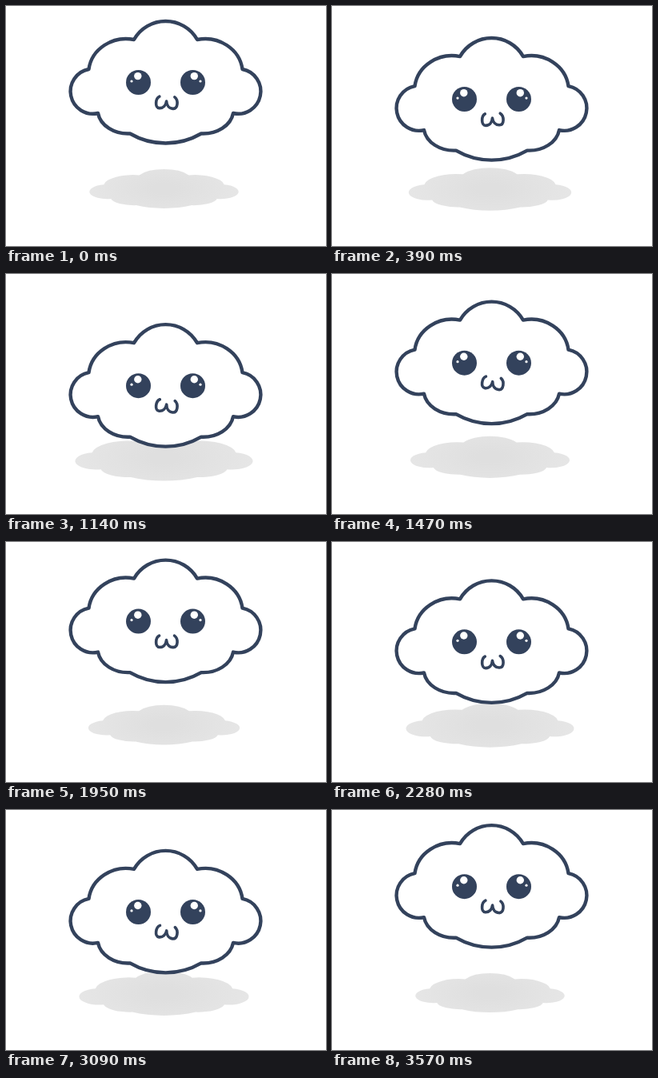
An HTML page with a canvas that plays this animation: 400 by 300 pixels, repeating every 3.6 s.

```html
<!DOCTYPE html>
<html lang="en">
<head>
<meta charset="utf-8">
<title>Floating cloud</title>
<style>
  html, body { margin: 0; width: 100%; height: 100%; overflow: hidden; background: #fff; }
  canvas { display: block; width: 400px; height: 300px; }
</style>
</head>
<body>
<canvas id="stage" width="400" height="300"></canvas>
<script>
const ctx = document.getElementById('stage').getContext('2d');
const INK = '#33425c';
const PERIOD = 1800;
const DROP = 53;

const cloud = new Path2D(
  'M160 42 A45.4 45.4 0 0 1 239 42 A47 43.6 0 0 1 295.5 79 ' +
  'A28.1 28.1 0 1 1 284 134 A38 30 0 0 1 244 159.5 ' +
  'A88.5 88.5 0 0 1 155 159.5 A38 30 0 0 1 115 134 ' +
  'A28.1 28.1 0 1 1 103.5 79 A47 43.6 0 0 1 160 42 Z');

const mouth = new Path2D(
  'M191.5 113.5 C186.5 116 186 128 192 128 C197 128 200 124 200.5 119 ' +
  'C201 124 204 128 209 128 C215.5 128 215.5 117 210.5 113.5');

function dot(x, y, r, color) {
  ctx.fillStyle = color;
  ctx.beginPath();
  ctx.arc(x, y, r, 0, Math.PI * 2);
  ctx.fill();
}

function eye(x, bigX, smallX) {
  dot(x, 95.5, 15.5, INK);
  dot(bigX, 87.6, 4.7, '#fff');
  dot(smallX, 94, 1.6, '#fff');
}

function drawShadow(fall) {
  const grow = 1 + 0.23 * fall;
  ctx.save();
  ctx.translate(197.5, 224);
  ctx.scale(grow, grow);
  ctx.translate(0, 4.5);
  ctx.scale(0.784, 0.321);
  ctx.translate(-199.5, -95.25);
  const shade = ctx.createRadialGradient(199.5, 95, 20, 199.5, 95, 120);
  shade.addColorStop(0, '#dfdfdf');
  shade.addColorStop(1, '#e6e6e6');
  ctx.fillStyle = shade;
  ctx.fill(cloud);
  ctx.restore();
}

function drawMouth(angle) {
  const tilt = (2.5 - 4.5 * Math.sin(angle)) * Math.PI / 180;
  ctx.save();
  ctx.translate(200.5, 121);
  ctx.rotate(tilt);
  ctx.translate(-200.5, -121);
  ctx.lineWidth = 3.6;
  ctx.stroke(mouth);
  ctx.restore();
}

function drawCloud(fall, angle) {
  ctx.save();
  ctx.translate(0, DROP * fall);
  ctx.lineJoin = ctx.lineCap = 'round';
  ctx.strokeStyle = INK;
  ctx.fillStyle = '#fff';
  ctx.lineWidth = 4.4;
  ctx.fill(cloud);
  ctx.stroke(cloud);
  eye(165.5, 164.8, 157);
  eye(233.5, 235.3, 243);
  drawMouth(angle);
  ctx.restore();
}

function draw(now) {
  const angle = (now % PERIOD) / PERIOD * Math.PI * 2;
  const fall = (1 - Math.cos(angle)) / 2;
  ctx.fillStyle = '#fff';
  ctx.fillRect(0, 0, 400, 300);
  drawShadow(fall);
  drawCloud(fall, angle);
}

const start = performance.now();
function tick() {
  draw(performance.now() - start);
  requestAnimationFrame(tick);
}
tick();
</script>
</body>
</html>
```
